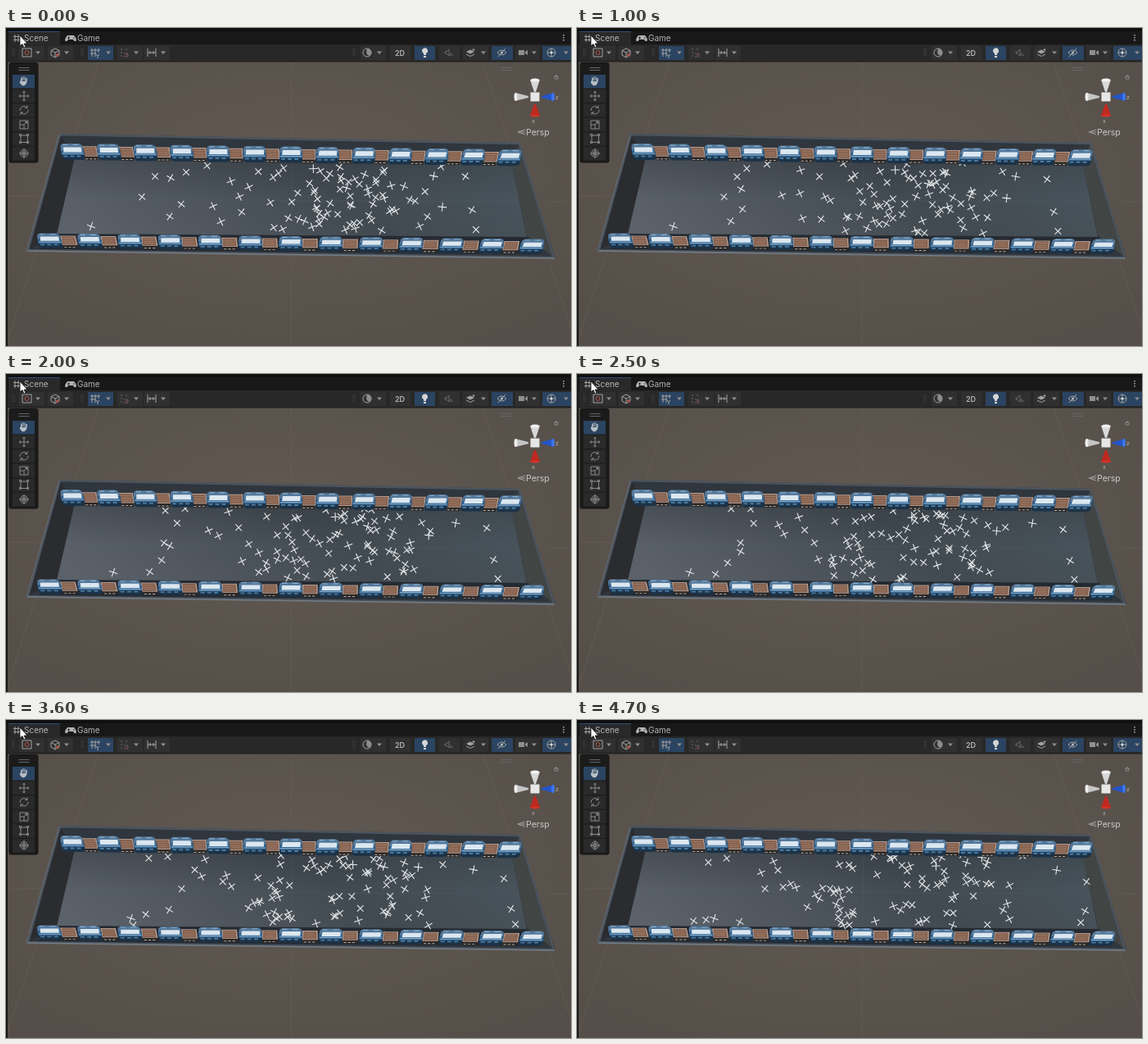
These frames come from a looping animation (690 px wide and 388 px high, 4.8 s). An HTML page:

```html
<!DOCTYPE html>
<html lang="en">
<head>
<meta charset="utf-8">
<title>Station crowd</title>
<style>
  html, body { margin: 0; width: 100%; height: 100%; overflow: hidden; background: #191919; }
  svg { display: block; width: 690px; height: 388px; }
  text { font-family: Inter, Roboto, sans-serif; fill: #b4b4b4; }
  .line { fill: none; stroke: #a2a2a2; stroke-width: 1; }
  .dim { opacity: .5; }
  .on { fill: #2b4461; }
  .grid { fill: none; stroke: #756d66; stroke-width: .7; opacity: .45; }
</style>
</head>
<body>
<svg viewBox="0 0 690 388" xmlns="http://www.w3.org/2000/svg">
  <defs>
    <radialGradient id="ground" cx=".5" cy=".4" r=".7">
      <stop offset="0" stop-color="#615952"/><stop offset="1" stop-color="#564f49"/>
    </radialGradient>
    <linearGradient id="floor" x1="0" y1=".6" x2="1" y2=".4">
      <stop offset="0" stop-color="#5a6168"/><stop offset=".3" stop-color="#4e555c"/>
      <stop offset=".6" stop-color="#424a51"/><stop offset="1" stop-color="#48535b"/>
    </linearGradient>
    <linearGradient id="shade" x2="0" y2="1">
      <stop offset="0" stop-color="#20252b" stop-opacity=".25"/><stop offset=".5" stop-color="#20252b" stop-opacity="0"/>
    </linearGradient>
    <path id="caret" d="M-3-1.5h6L0 2z" fill="#909090"/>
    <path id="grip" d="M-1-5v10M1-5v10" stroke="#555" stroke-width=".8" stroke-dasharray="1 1"/>
    <path id="handle" d="M-6.500-1.500h13M-6.500 1.500h13" stroke="#666" stroke-width="1"/>
    <path id="cross" d="M-3.800-3.800L3.800 3.800M3.800-3.800L-3.800 3.800" stroke="#e6e9eb" stroke-width="1.100"/>
    <g id="engine">
      <path d="M-14-4h28V9l-3 2h-22l-3-2z" fill="#1c3247"/>
      <path d="M-13-7l3-2h20l3 2l1 6h-28z" fill="#54789a"/>
      <path d="M-14-1h28v6h-28z" fill="#34648f"/>
      <path d="M-10-4.500H11.500V1.500H-11z" fill="#dbe7f0"/>
      <path d="M-10-7.500h6M2-7.500h7M-13 3h26" stroke="#86abca" stroke-width="1.200"/>
      <path d="M-12 6.500h24" stroke="#47789f" stroke-width="2" stroke-dasharray="5 3"/>
    </g>
    <g id="wagon">
      <path d="M-8 5H8v6H-8z" fill="#2b2725"/>
      <path d="M-9-6h18l.5 12.500h-19z" fill="#b09a90"/>
      <path d="M-7.500-5h15l.5 10.500H-8z" fill="#86624f"/>
      <path d="M-6-2.500H6M-6 .5H6M-6 3H6" stroke="#9b7766" stroke-width="1"/>
      <path d="M-7 9.500H7" stroke="#b5afa9" stroke-width="1" stroke-dasharray="3 2"/>
    </g>
  </defs>

  <rect x="2" y="41" width="688" height="347" fill="url(#ground)"/>
  <path class="grid" d="M113 41L0 386M348 41V388M582 41L690 366M2 205L66 206M663 212H690"/>

  <!-- open box -->
  <path d="M66 129L627 140L671 281L25 272z" fill="#30363d"/>
  <path d="M66 130L84 160L62 251L27 271z" fill="#2a2c30"/>
  <path d="M627 141L617 162L636 253L669 280z" fill="#414544"/>
  <path d="M84 158L617 162L636 256L62 252z" fill="url(#floor)"/>
  <path d="M84 158L617 162L636 256L62 252z" fill="url(#shade)"/>
  <path d="M62 251L636 255L650 276L40 270z" fill="#252a31"/>
  <path d="M76 209L626 212M350 160L349 252" stroke="#59636c" stroke-width=".6" opacity=".5"/>
  <path d="M66 130L627 141L669 280L27 271z" fill="none" stroke="#4b545e" stroke-width="2.500"/>
  <path d="M26 272L670 281" stroke="#747e87" stroke-width="1.500"/>
  <path d="M65 130L25 272" stroke="#6b7680" stroke-width=".8"/>

  <g id="crowd"></g>
  <g id="trains"></g>

  <!-- orientation gizmo -->
  <path d="M640 63h12l-5 15h-2z" fill="#d8d8d8"/><ellipse cx="646" cy="63.500" rx="5" ry="2" fill="#f1f1f1"/>
  <path d="M622 79v10l16-4v-2z" fill="#c6c6c6"/><ellipse cx="622.500" cy="84" rx="2" ry="5" fill="#eee"/>
  <path d="M669 79v10l-15-4v-2z" fill="#2455c8"/><ellipse cx="668" cy="84" rx="2" ry="5" fill="#3e76ec"/>
  <path d="M640 107h12l-5-14h-2z" fill="#c0291f"/><ellipse cx="646" cy="107" rx="6" ry="1.500" fill="#d0352a"/>
  <rect x="640.500" y="78.500" width="11" height="11" fill="#e6e6e6"/>
  <text x="671" y="87" font-size="7">z</text>
  <text x="642" y="116" font-size="7">x</text>
  <path d="M670 59h4v3h-4zM671 59v-1h2v1" class="line" opacity=".7"/>
  <path d="M634 124L625 127L634 130M628 127h6" class="line"/>
  <text x="635" y="131" font-size="10.500" style="fill:#c8c8c8">Persp</text>

  <!-- window bars -->
  <path d="M0 0H690V20H0zM0 20H2V388H0z" fill="#181818"/>
  <path d="M0 0H690V4H0z" fill="#101010"/>
  <rect x="3" y="4" width="63" height="17" fill="#292929"/>
  <path d="M3 4.500H66" stroke="#2d4f76"/>
  <rect x="2" y="20" width="688" height="21" fill="#282828"/>
  <path d="M2 41H690" stroke="#1c1c1c"/>
  <path class="line" d="M11 8v9M15 8v9M9 10.500h9M9 14.500h9"/>
  <text x="22" y="16" font-size="10">Scene</text>
  <path d="M75 9h8q3 3 3 6q-2 3-4-1h-6q-2 4-4 1q0-3 3-6z" fill="#b4b4b4"/>
  <path d="M75 12h3M76.500 10.500v3M82 12h1.500" stroke="#222"/>
  <text x="87" y="16" font-size="10">Game</text>
  <path d="M681 8v1.500M681 11v1.500M681 14v1.500" stroke="#b4b4b4" stroke-width="1.500"/>

  <!-- toolbar -->
  <g fill="#303030">
    <path d="M16 22h31v17H16zM51 22h31v17H51zM136 22h31v17H136zM169 22h31v17H169zM433 22h31v17H433zM469 22h25v17H469zM529 22h25v17H529zM558 22h31v17H558zM622 22h30v17H622z"/>
    <path class="on" d="M100 22h31v17H100zM499 22h25v17H499zM593 22h26v17H593zM655 22h35v17H655z"/>
  </g>
  <path class="line" d="M20 25h11v10H20z"/><circle cx="25.500" cy="30" r="2.500" fill="none" stroke="#b5574b"/>
  <path class="line" d="M60 25l5 2.500v5.500l-5 3l-5-3v-5.500zM55 27.500l5 2.500l5-2.500M60 30v6"/><circle cx="63" cy="33" r="2" fill="#a8564a"/>
  <path class="line" d="M105 25v10M109 25v10M113 25v5M103 27h12M103 31h7M110 32l2 2l2-2M112 34v3"/>
  <path class="line dim" d="M140 26h3M140 30h3M140 34h3M146 26h3M144 31h5v4h-5" stroke-dasharray="2 1"/><path d="M147 31v4" stroke="#8c4640"/>
  <path class="line" d="M173 25v10M183 25v10M176 28v4M180 28v4M173 30h10"/>
  <circle class="line" cx="441" cy="30" r="5"/><path d="M441 25a5 5 0 0 1 3 9q-6-2-3-9z" fill="#8d8d8d"/>
  <text x="475" y="33.500" font-size="9" font-weight="600">2D</text>
  <path d="M508 28a3.500 3.500 0 1 1 5 3v2h-3v-2q-2-1-2-3zM510 34h3v2h-3z" fill="#d6d6d6"/>
  <path class="line dim" d="M536 29h2l3-3v8l-3-3h-2zM543 30v4M545 32v2"/>
  <path d="M562 29l5-2.500l5 2.500l-5 2.500z" fill="#a2a2a2"/><path class="line" d="M562 32l5 2.500l5-2.500M571 25v3M569.500 26.500h3"/>
  <path class="line" d="M600 30q5.500-6 11 0q-5.500 6-11 0zM601 35l9-10"/><circle cx="605.500" cy="30" r="1.500" fill="#bbb"/>
  <path d="M626 27h7v6h-7zM634 29l3-2v6l-3-2z" fill="#8f8f8f"/>
  <circle class="line" cx="666" cy="30" r="5"/><path class="line" d="M661 30h10M666 25v10"/><circle cx="666" cy="30" r="1.500" fill="#ddd"/>

  <!-- tool palette -->
  <rect x="4" y="42.500" width="35" height="121.500" rx="2" fill="#1b1b1b" stroke="#141414"/>
  <g id="keys"></g>
  <path d="M17 66l2 1v-6M19 64v-4M21 64v-5M23 64v-4.500M25 65v-4v5q-1 4-4 4q-2 0-4-4z" stroke="#b8bfc6" stroke-width="1" fill="#b8bfc6"/>
  <g opacity=".8">
    <path class="line" d="M22 77.500v11M16.500 83h11M20.500 79l1.500-2l1.500 2M20.500 87l1.500 2l1.500-2M18 81.500l-2 1.500l2 1.500M26 81.500l2 1.500l-2 1.500"/>
    <path class="line" d="M17 101a5 5 0 0 1 9-3.500v-3M27 99.500a5 5 0 0 1-9 3.500v3M26 97.500h-3M18 103h3"/>
    <path class="line" d="M17 113h10v10H17zM17 118h5v5M22 118l3.500-3.500M23 114.500h2.500v2.500"/>
    <path class="line" d="M18 131h8.500v8.500H18zM16.500 129.500h2v2h-2zM25.500 129.500h2v2h-2zM16.500 138.500h2v2h-2zM25.500 138.500h2v2h-2z"/>
    <circle class="line" cx="22" cy="153" r="4.500"/><path class="line" d="M22 147v12M16 153h12M20 151h4v4h-4z"/>
  </g>
  <g id="marks"></g>

  <path d="M17 9v13l3-2.500l2 4.500l2-1l-2-4h4z" fill="#fff" stroke="#111" stroke-width=".8"/>
</svg>

<script>
const NS = 'http://www.w3.org/2000/svg';
const LOOP = 4800, STEP = 100, SPEED = 13.5;
const byId = id => document.getElementById(id);

function add(parent, tag, attrs) {
  const el = document.createElementNS(NS, tag);
  for (const k in attrs) el.setAttribute(k, attrs[k]);
  byId(parent).appendChild(el);
  return el;
}
const stamp = (parent, id, transform) => add(parent, 'use', { href: '#' + id, transform });
const at = (x, y) => `translate(${x} ${y})`;

for (let i = 0; i < 6; i++)
  add('keys', 'rect', { x: 8, y: 57 + i * 17.6, width: 27, height: 16.5, fill: i ? '#2a2a2a' : '#2b4461' });
for (const x of [39, 74, 125, 159, 192, 456, 583, 645, 684]) stamp('marks', 'caret', at(x, 30));
for (const x of [9, 93, 425]) stamp('marks', 'grip', at(x, 30));
for (const x of [22, 611]) stamp('marks', 'handle', at(x, 50));

function trainRow(x, y, gap, rise, scale) {
  const place = (id, i) => stamp('trains', id,
    `${at(x + gap * i, y + rise * i)} scale(${scale}) skewX(${(6 - i) * 2})`);
  for (let i = 0; i < 12; i++) place('wagon', i + 0.48);
  for (let i = 0; i < 13; i++) place('engine', i);
}
trainRow(81, 150, 44.5, 0.6, 1);
trainRow(53, 258.5, 49.1, 0.6, '1.03 .9');

let seed = 11;
const random = () => (seed = seed * 16807 % 2147483647) / 2147483647;
const spread = n => (random() + random() + random() - 1.5) * n;

const crowd = [];
function addWalker(x, y, heading) {
  const a = heading * Math.PI / 180;
  crowd.push({
    x, y, vx: SPEED * Math.cos(a), vy: SPEED * Math.sin(a),
    turn: spread(35), el: add('crowd', 'use', { href: '#cross' })
  });
}

// Lone walkers near both ends: x, y, heading in degrees.
const loners = [
  [104, 242, 0], [166, 206, 0], [182, 181, 2], [200, 230, 155], [201, 183, 92],
  [214, 215, 153], [220, 176, 200], [561, 181, 15], [569, 222, 10], [574, 246, 8]
];
for (const walker of loners) addWalker(...walker);

// Everyone else: an even scatter plus a dense middle, rows spread by the golden ratio.
for (let i = 0; i < 80; i++) {
  const x = i < 36 ? 250 + i * 8.2 + spread(20) : 410 + spread(75);
  addWalker(x, 168 + (i * 0.618 % 1) * 80, random() * 360);
}

// Bounce a value between two walls.
function fold(v, lo, hi) {
  const span = hi - lo, r = (((v - lo) % (2 * span)) + 2 * span) % (2 * span);
  return lo + (r < span ? r : 2 * span - r);
}

function draw(now) {
  const t = Math.floor(now % LOOP / STEP) * STEP / 1000;
  for (const w of crowd) {
    const x = fold(w.x + w.vx * t, 100, 626), y = fold(w.y + w.vy * t, 164, 251);
    w.el.setAttribute('transform', `${at(x.toFixed(2), y.toFixed(2))} rotate(${w.turn.toFixed(1)})`);
  }
  requestAnimationFrame(() => draw(performance.now() - start));
}
const start = performance.now();
draw(0);
</script>
</body>
</html>
```
